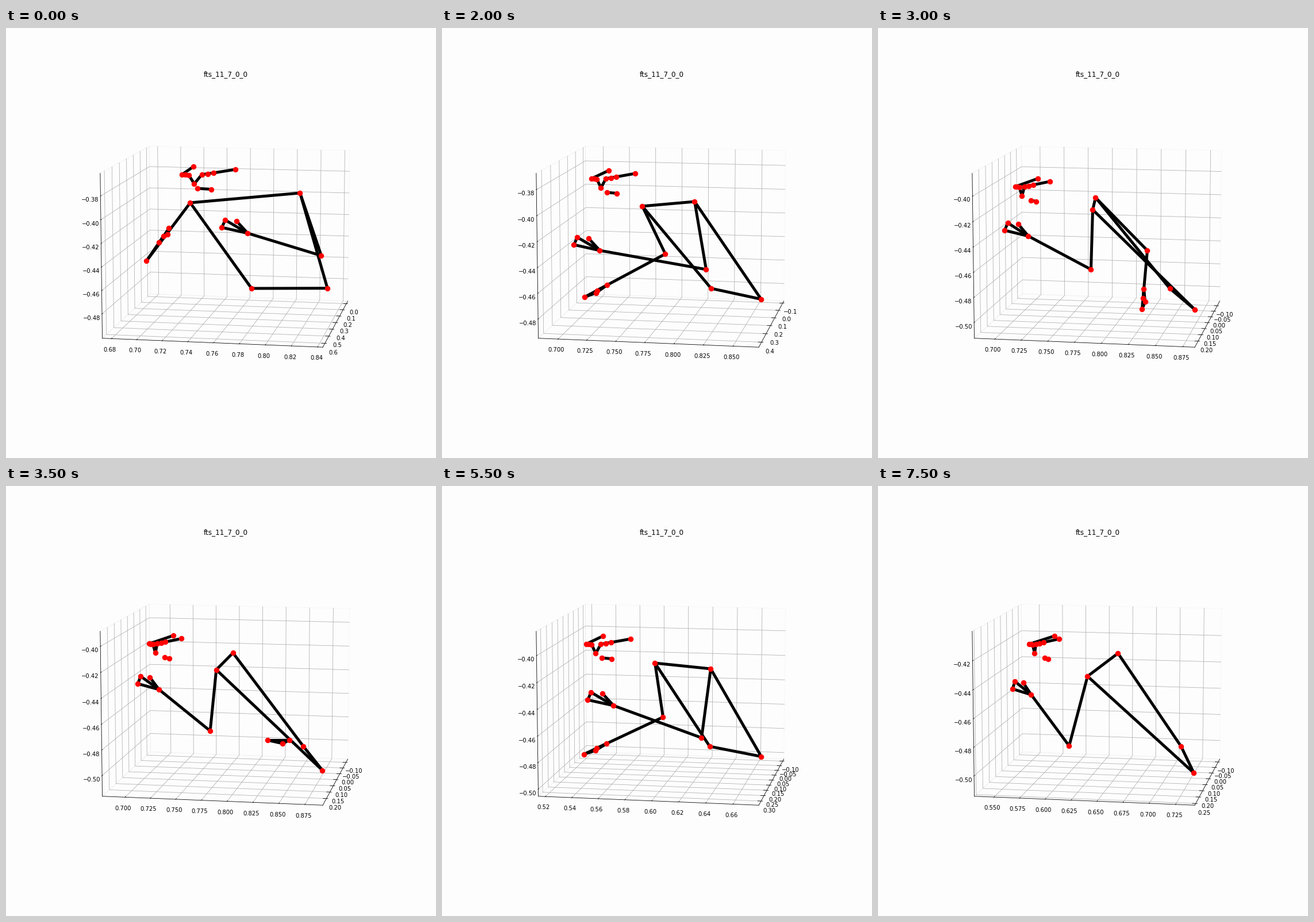
Animation of 748x748 px, one loop 8000 ms. Source, as a matplotlib script:

```python
import math
import numpy as np
import matplotlib.pyplot as plt
from matplotlib.animation import FuncAnimation

STAGE, DPI = 748, 88
PX = 72 / DPI                       # one pixel in points
STEP, FRAMES = 500, 16

# Box, camera and picture plane
SIZE = np.array([8, 8, 6]) / 7
HALF = SIZE * 25 / 48
PAD = 11.5 * 48 / 1152 / 12
ANGLE = math.radians(10)
C, S = math.cos(ANGLE), math.sin(ANGLE)
RIGHT = np.array([-S, C, 0])
UP = np.array([-S * C, -S * S, C])
TOWARD = np.array([C * C, C * S, S])
DIST, SCALE = 10, 0.77 * STAGE / 0.185
CENTER = (391.13, 369.96)

# Which box edge carries each axis, and where its ticks point
SIDES = np.array([(0, 1, -1), (1, 0, -1), (1, -1, 0)])
TICK_DIR = (1, 0, 0)
PANE_GREYS = (0.95, 0.9, 0.925)

# Two takes of one turning gesture, sampled at a few key times
TIMES = (0, 2000, 3000, 4500, 5500, 6500, 7500)
CUT = 4                             # first key of the second take
GONE = (math.nan, math.nan)

NOSE = ((328, 271), (277, 278), (251, 292), (279, 287),
        (268, 291), (261, 285), (273, 291))
SHOULDER_L = ((512, 287), (440, 302), (374, 316), (351, 327),
              (468, 318), (395, 325), (365, 331))
SHOULDER_R = ((321, 304), (349, 310), (379, 295), (428, 281),
              (371, 308), (392, 295), (418, 291))
ELBOW_L = ((549, 396), (460, 420), (371, 420), (325, 438),
           (452, 438), (350, 441), (333, 452))
ELBOW_R = ((245, 405), (389, 393), (469, 387), GONE, (385, 402), GONE, GONE)
WRIST_L = ((421, 357), (275, 387), (262, 362), (276, 338),
           (299, 382), (250, 359), (267, 363))
WRIST_R = ((267, 373), (288, 447), (463, 454), (440, 418),
           (287, 448), (335, 466), GONE)

# Axis limits at the key times
LIMITS = (
    ((-0.031, 0.639), (-0.118, 0.446), (-0.136, 0.239), (-0.098, 0.249),
     (-0.114, 0.328), (-0.132, 0.301), (-0.120, 0.255)),
    ((0.6762, 0.8405), (0.6866, 0.8679), (0.6846, 0.8819), (0.6761, 0.8995),
     (0.5179, 0.6756), (0.5261, 0.7114), (0.5349, 0.7389)),
    ((-0.4981, -0.3638), (-0.4925, -0.3701), (-0.510, -0.3847),
     (-0.5208, -0.4038), (-0.5029, -0.3845), (-0.5143, -0.3954),
     (-0.512, -0.402)),
)

CHAINS = (
    (7, 3, 2, 1, 0, 4, 5, 6, 8), (9, 10), (11, 12),
    (11, 13, 15, 17, 19, 15, 21), (12, 14, 16, 18, 20, 16, 22),
    (11, 23, 24, 12),
)


def sample(path, t):
    """Linear motion along a path; the second take opens with the
    speed of the first one."""
    p = np.array(path, float)
    if TIMES[CUT - 1] < t < TIMES[CUT]:
        return p[CUT] + (TIMES[CUT] - t) / TIMES[1] * (p[0] - p[1])
    if t in TIMES:
        return p[TIMES.index(t)]
    b = next(i for i, key in enumerate(TIMES) if key > t)
    u = (t - TIMES[b - 1]) / (TIMES[b] - TIMES[b - 1])
    return p[b - 1] * (1 - u) + p[b] * u


def face(nose, turn):
    """Eyes, ears and mouth slide around the nose as the head turns."""
    def spot(dx, slide, dy):
        return nose + (dx + slide * turn, dy)
    eye_l = np.linspace(spot(4.5, 4.5, -16), spot(19.5, 7.5, -19), 3)
    eye_r = np.linspace(spot(-5, -2.5, -15.5), spot(-12, -5, -16), 3)
    ears = [spot(49, 12, -25), spot(26.5, -14.5, -30)]
    mouth = [spot(25, 2.2, 9.5), spot(15, -5, 8)]
    return [nose, *eye_l, *eye_r, *ears, *mouth]


def left_hand(wrist, turn):
    reach = min(45, 42 + 18 * turn)
    return [wrist + (-reach * part, -rise)
            for part, rise in ((1, 10), (0.87, 23), (0.43, 21))]


def right_hand(elbow, wrist, chest):
    """The hand extends the forearm; with the elbow out of view it
    points away from the chest and hides the thumb."""
    if np.isnan(elbow[0]):
        hand = np.array([math.copysign(38, wrist[0] - chest[0]), 0])
        return [wrist + hand * 0.7 + (0, 6), wrist + hand, GONE]
    arm = wrist - elbow
    length = np.hypot(*arm)
    hand = arm / length * (22 + 0.2 * length)
    return [wrist + hand * 0.6 + (4, 1), wrist + hand, wrist + hand * 0.45]


def body(t):
    nose, sh_l, sh_r, el_l, el_r, wr_l, wr_r = (
        sample(path, t) for path in (NOSE, SHOULDER_L, SHOULDER_R, ELBOW_L,
                                     ELBOW_R, WRIST_L, WRIST_R))
    turn = (sh_l[0] - sh_r[0]) / 100
    hand_l = left_hand(wr_l, turn)
    hand_r = right_hand(el_r, wr_r, (sh_l + sh_r) / 2)
    fingers = [p for pair in zip(hand_l, hand_r) for p in pair]
    hips = [(552 + 4 * turn, 489 - 19 * turn), (506 - 41 * turn, 453)]
    joints = [*face(nose, turn), sh_l, sh_r, el_l, el_r, wr_l, wr_r,
              *fingers, *hips]
    return np.array(joints, float) - (0.5, 0)


def project(points):
    p = np.asarray(points, float)
    w = DIST - p @ TOWARD
    return (CENTER[0] + SCALE * (p @ RIGHT) / w,
            CENTER[1] - SCALE * (p @ UP) / w)


def moved(point, axis, value):
    p = np.array(point, float)
    p[axis] = value
    return p


def ticks(lo, hi):
    raw = (hi - lo) / 9
    mag = 10 ** math.floor(math.log10(raw))
    step = next(m * mag for m in (1, 2, 2.5, 5, 10) if m * mag >= raw)
    digits = next(d for d in range(6) if abs(round(step, d) - step) < 1e-9)
    for n in range(math.ceil(lo / step), math.floor(hi / step) + 1):
        yield n * step, f"{n * step:.{digits}f}".replace("-", "\u2212")


plt.rcParams["font.family"] = "DejaVu Sans"
fig = plt.figure(figsize=(STAGE / DPI, STAGE / DPI), dpi=DPI,
                 facecolor="#fdfdfd")
ax = fig.add_axes([0, 0, 1, 1])


def stroke(points, color, width, z, **kw):
    ax.plot(*project(points), color=color, lw=width * PX, zorder=z, **kw)


def draw_panes():
    for i, grey in enumerate(PANE_GREYS):
        j, k = (a for a in range(3) if a != i)
        ring = [moved(moved(-HALF, j, sj * HALF[j]), k, sk * HALF[k])
                for sj, sk in ((-1, -1), (1, -1), (1, 1), (-1, 1), (-1, -1))]
        stroke(ring, str(grey), 1, 1, alpha=0.5)


def draw_axis(i, lo, hi):
    base = SIDES[i] * HALF
    stroke([moved(base, i, -HALF[i]), moved(base, i, HALF[i])], "black", 0.8, 2)
    d = TICK_DIR[i]
    nudge = moved(np.zeros(3), d, SIDES[i][d] * SIZE[d] / 12)
    j, k = (i - 2) % 3, (i - 1) % 3
    for value, label in ticks(lo, hi):
        at = ((value - lo) / (hi - lo) - 0.5) * SIZE[i]
        back, spot = moved(-HALF, i, at), moved(base, i, at)
        stroke([moved(back, j, HALF[j]), back, moved(back, k, HALF[k])],
               "#b0b0b0", 0.8, 2)
        stroke([spot + 0.1 * nudge, spot - 0.2 * nudge], "black", 0.8, 3,
               solid_capstyle="butt")
        x, y = project(spot + SIDES[i] * SIZE * PAD)
        ax.text(x, y, label, size=10 * PX, ha="center", va="top", zorder=3)


def draw_body(joints):
    for chain in CHAINS:
        for a, b in zip(chain, chain[1:]):
            ax.plot(*joints[[a, b]].T, color="black", lw=5 * PX, zorder=4,
                    solid_capstyle="projecting")
    ax.plot(*joints.T, "o", color="red", ms=math.sqrt(20) * PX, mew=5 * PX,
            zorder=5)


def update(n):
    t = n * STEP
    ax.clear()
    ax.set(xlim=(0, STAGE), ylim=(STAGE, 0))
    ax.axis("off")
    ax.text(382.5, 83.8, "fts_11_7_0_0", size=12 * PX, ha="center",
            va="baseline")
    draw_panes()
    for i, path in enumerate(LIMITS):
        draw_axis(i, *sample(path, t))
    draw_body(body(t))
    return []


anim = FuncAnimation(fig, update, frames=FRAMES, interval=STEP,
                     repeat=True, repeat_delay=0, init_func=lambda: [])
plt.show()
```
